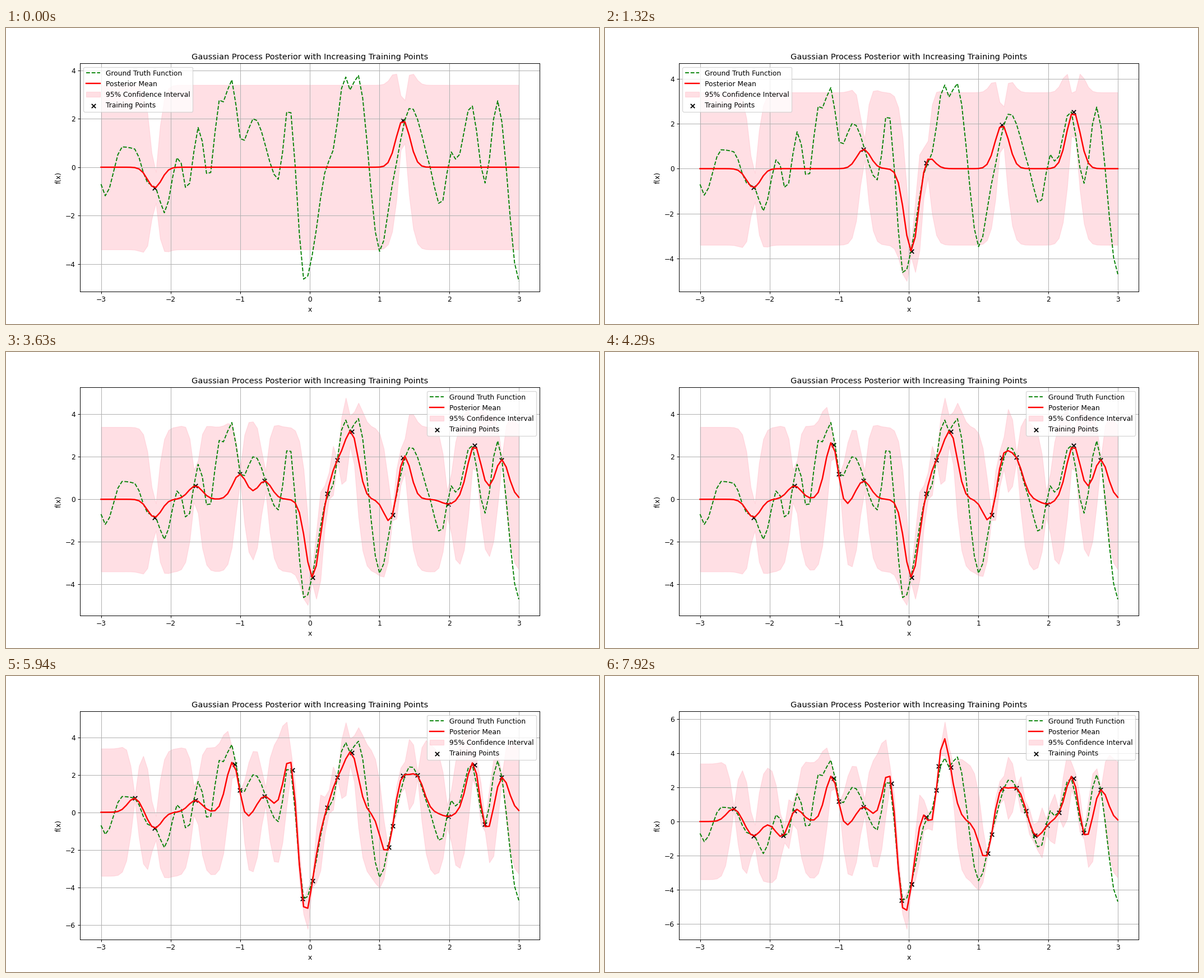
Animation, 1058 px wide and 529 px high, one loop 8 s. Source, as a matplotlib script:

```python
import numpy as np
import matplotlib.pyplot as plt
from matplotlib.animation import FuncAnimation

W, H = 1058, 529
LOOP, TICK, STEP = 8000, 40, 330  # ms: loop, drawing interval, time per new point
VARIANCE, LENGTH, NOISE = 3.0, 0.1, 0.001
N = 100

# Turning points and shoulders of the true function: (grid position, value).
KEYS = [
    (0, -0.7), (1, -1.18), (5, 0.84), (8, 0.75), (11, -0.63), (13, -0.85),
    (15, -1.88), (18.4, 0.48), (20.4, -0.98), (23.2, 1.68), (25.5, -0.52),
    (28.2, 2.82), (29, 2.7), (30.9, 3.62), (33.4, 1), (36.3, 2.03), (42, -0.5),
    (44.5, 2.6), (48.3, -4.75), (50, -3.67), (53.2, -0.1), (55, 0.7),
    (57.8, 3.76), (59.1, 3.18), (60.8, 3.82), (66.1, -3.48), (69.1, -0.65),
    (73.4, 2.47), (77.8, 0.12), (80.5, -1.6), (83.1, 0.64), (84.3, 0.28),
    (87.7, 2.6), (91, -0.65), (93.9, 2.75), (99, -4.7)]

# Training inputs in the order they are added; the first two are there at once.
train_x = np.array([
    -2.231, 1.337, 0.248, -0.65, 2.362, 0.037, -1.644, -1.008, 2.755,
    0.598, 1.188, 1.987, 0.394, 1.541, -1.084, -0.108, 2.506, -2.517,
    -0.254, 1.133, 0.428, 1.684, 0.037, 1.813, 2.158, -1.805])


def ease_through(keys, at):
    """Monotone cubic through the keys, flat at every turning point."""
    x, y = np.array(keys, float).T
    step = np.diff(x)
    rise = np.diff(y) / step
    before, after = rise[:-1], rise[1:]
    slope = np.zeros(len(x))
    same_way = before * after > 0
    slope[1:-1][same_way] = (2 * before * after / (before + after))[same_way]

    i = np.clip(np.searchsorted(x, at, side="right") - 1, 0, len(step) - 1)
    t = (at - x[i]) / step[i]
    blend = t * t * (3 - 2 * t)
    bend = t * (1 - t) * step[i] * ((1 - t) * slope[i] - t * slope[i + 1])
    return y[i] + (y[i + 1] - y[i]) * blend + bend


def kernel(a, b):
    return VARIANCE * np.exp(-(a[:, None] - b[None, :]) ** 2 / (2 * LENGTH ** 2))


def posterior(n):
    """Mean and 95% half-width on the grid, given the first n points."""
    x, y = train_x[:n], train_y[:n]
    cross = kernel(grid, x)
    gain = np.linalg.solve(kernel(x, x) + NOISE * np.eye(n), cross.T)
    var = VARIANCE - np.sum(cross.T * gain, axis=0)
    return y @ gain, 1.96 * np.sqrt(np.maximum(var, 0))


grid = np.linspace(-3, 3, N)
truth = ease_through(KEYS, np.arange(N))
# Each observation takes the value of the nearest grid point.
train_y = truth[np.rint((train_x + 3) * (N - 1) / 6).astype(int)]
states = [posterior(n) for n in range(2, len(train_x) + 1)]

fig, ax = plt.subplots(figsize=(12, 6), dpi=W / 12)
truth_line, = ax.plot(grid, truth, "g--", label="Ground Truth Function")
mean_line, = ax.plot(grid, 0 * grid, "r", lw=2, label="Posterior Mean")
band = ax.fill_between(grid, -1, 1, color="pink", alpha=0.5,
                       label="95% Confidence Interval")
points = ax.scatter(train_x[:2], train_y[:2], c="black", marker="x",
                    label="Training Points")
ax.set_title("Gaussian Process Posterior with Increasing Training Points",
             fontsize=11.85)
ax.set_xlabel("x")
ax.set_ylabel("f(x)")
ax.set_xlim(-3.3, 3.3)
ax.grid(True)
legend = ax.legend(handles=[truth_line, mean_line, band, points],
                   loc="upper left")


def update(frame):
    k = min((frame * TICK + TICK - 1) // STEP, len(states) - 1)
    mean, half = states[k]
    low, high = mean - half, mean + half

    mean_line.set_ydata(mean)
    band.set_verts([np.column_stack([np.r_[grid, grid[::-1]],
                                     np.r_[low, high[::-1]]])])
    points.set_offsets(np.column_stack([train_x[:k + 2], train_y[:k + 2]]))

    bottom, top = min(low.min(), truth.min()), max(high.max(), truth.max())
    margin = 0.05 * (top - bottom)
    ax.set_ylim(bottom - margin, top + margin)
    legend.set_loc("upper left" if k < 8 else "upper right")
    return mean_line, band, points, legend


anim = FuncAnimation(fig, update, frames=LOOP // TICK, interval=TICK,
                     repeat=True, repeat_delay=0, blit=False)
plt.show()
```
